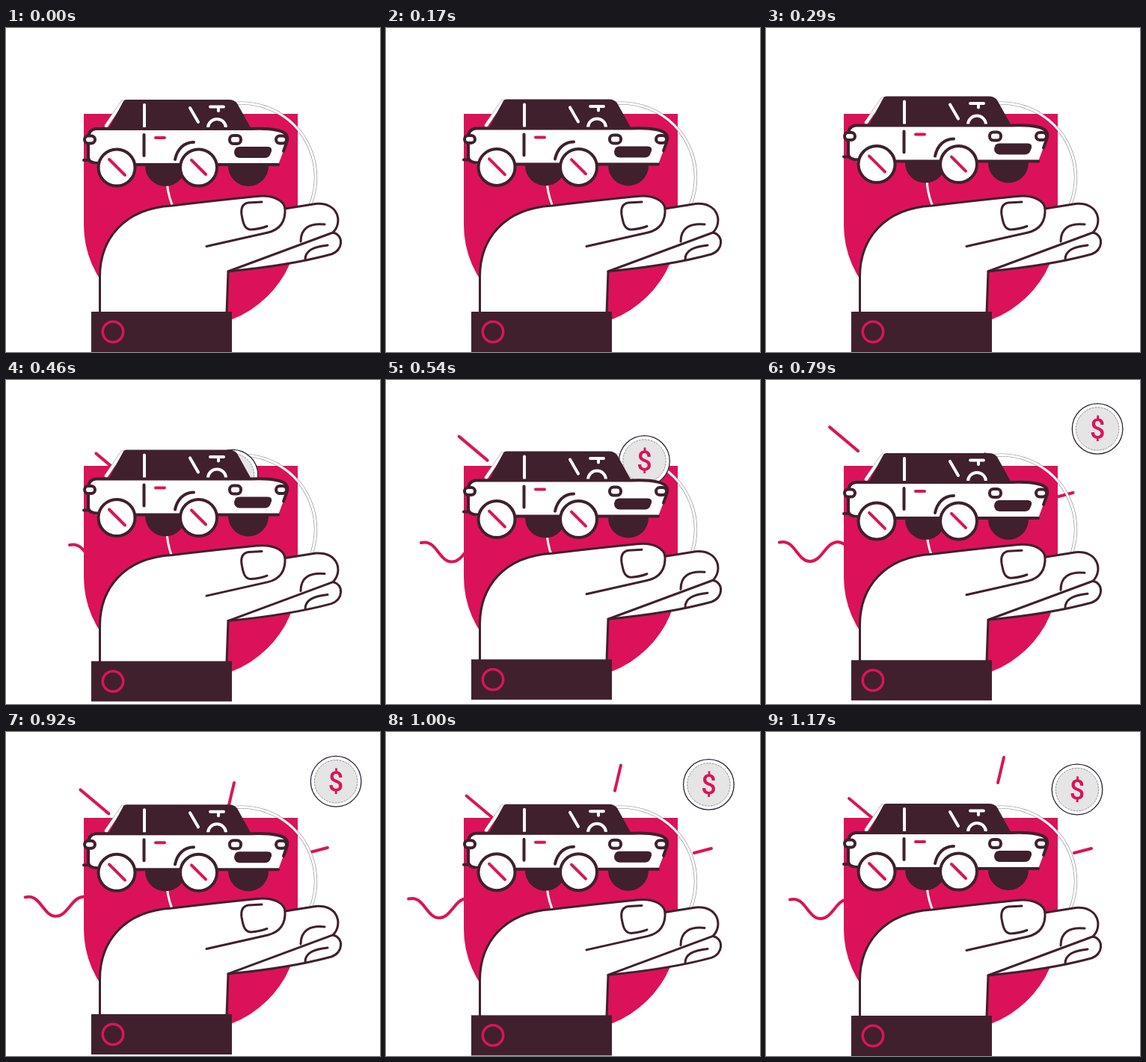
Write an HTML page that moves like this. It is 500x434 px and loops after 1.29 s.

```html
<!DOCTYPE html>
<html lang="en">
<head>
<meta charset="utf-8">
<title>Car and hand</title>
<style>
  html, body { margin: 0; width: 100%; height: 100%; overflow: hidden; background: #fff; }
  svg { display: block; width: 100vw; height: 100vh; stroke-linecap: round; stroke-linejoin: round; }
  .ink { fill: none; stroke: #40202d; stroke-width: 4; }
  .hand .ink { stroke-width: 3; }
  .pink { fill: none; stroke: #d91558; stroke-width: 4; }
  .white { fill: none; stroke: #fff; stroke-width: 4; }
  .paper { fill: #fff; }
  .dark { fill: #40202d; }
  text { font: 500 36px Roboto, "Open Sans", sans-serif; fill: #db1259; text-anchor: middle; }
</style>
</head>
<body>
<svg viewBox="0 0 500 434">
  <circle cx="314.5" cy="200" r="99.5" fill="none" stroke="#888" stroke-width="4.2"/>
  <path id="wave" class="pink" d="M18 215.5Q20 215 23 215C39 215 43 241 59 241S80 215 96 215S117 241 133 241"/>
  <path id="rayLeft" class="pink" d="M0 0L38 32"/>
  <path id="rayTop" class="pink" d="M0 0L-8 34"/>
  <path id="rayRight" class="pink" d="M0 0L-23 6"/>
  <path fill="#db1259" d="M104 115H390V264A143 137 0 0 1 104 264Z"/>
  <circle class="white" cx="314.5" cy="200" r="99.5" style="stroke-width:3"/>

  <g id="coin">
    <circle class="paper" r="33.8" stroke="#2b2030" stroke-width="1.3"/>
    <circle r="28.7" fill="#e5e5e5" stroke="#777" stroke-width=".8" stroke-dasharray="2 2"/>
    <text y="13">$</text>
  </g>

  <g id="car">
    <circle class="dark" cx="213" cy="185" r="27"/>
    <circle class="dark" cx="324" cy="185" r="27"/>
    <path d="M134 131L156 99" fill="none" stroke="#999" stroke-width="5"/>
    <path class="white" d="M134 131L156 99"/>
    <path class="dark" d="M136 137L157 98Q158 96 161 96H298Q305 96 309 101L329 137Z"/>
    <path class="white" d="M185 103V135M246 107L257 126M273 105.5H291M284 105.5V111"/>
    <circle class="white" cx="282" cy="134" r="12"/>
    <path class="paper" d="M120 135H328L362 136Q378 139 376 151L364 183H122Q110 182 110 174V150Q109 136 120 135Z"/>
    <path class="ink" d="M124 181Q110 181 110 173V148Q110 136 120 135H328Q350 134 363 137Q378 140 376 151L371 165
      M104 177H111M172 183H364M184.5 143V171M226 176C229 162 238 153 251 153"/>
    <g class="ink" style="fill:#fff">
      <rect x="105" y="144.5" width="14" height="10" rx="5"/>
      <rect x="299" y="144" width="15" height="11" rx="5"/>
      <rect x="361" y="144.5" width="14" height="10" rx="5"/>
    </g>
    <path class="dark" d="M312 159H350Q356 159 355 165L353 170Q351 174 346 174H312Q305 173 305 166Q306 159 312 159Z"/>
    <path class="pink" d="M200 147H212"/>
    <g class="ink" style="fill:#fff">
      <circle cx="148" cy="187" r="24.5"/>
      <circle cx="257.5" cy="187" r="24.5"/>
    </g>
    <path class="pink" d="M138 176L159 197M248 177L267 196"/>
  </g>

  <g id="hand" class="hand">
    <path class="ink" style="fill:#fff" d="M125.5 382V332C126 284 156 242 222 238Q280 231 335 225.5C359 223 372 232 373 242L414 235.5
      C444 233 451 260 437 274C452 277 451 298 435 303Q380 318 297 326L295 382"/>
    <path class="ink" d="M373 241C374 258 367 270 350 274L268 292.5M297 326L437 274
      M342 233L324 234Q313 236 315 250C317 262 319 270 328 270Q340 269 349 265.5
      M426 263C406 261 394 268 394 286M430 291C411 293 400 298 400 310"/>
    <rect class="dark" x="114" y="380" width="188" height="54"/>
    <circle class="pink" cx="143" cy="407" r="13.7" style="stroke-width:3.5"/>
  </g>
</svg>
<script>
const LOOP = 1290, STEPS = 31;

function place(id, x, y) {
  document.getElementById(id).setAttribute("transform", `translate(${x} ${y})`);
}

function draw() {
  const step = Math.floor(performance.now() % LOOP * STEPS / LOOP + .11);

  // Eased progress between two steps, and a rise followed by a fall
  const ease = (from, to) => {
    const u = Math.min(1, Math.max(0, (step - from) / (to - from)));
    return u * u * (3 - 2 * u);
  };
  const bump = (from, peak, to) => ease(from, peak) - ease(peak, to);

  place("car", 0, 2 * bump(11, 18, 28) - 4.6 * bump(3, 7.5, 15));
  place("hand", 0, -6.8 * bump(7, 15, 26));

  // Parts shoot out from behind the car, then settle back
  const out = ease(8, 16), back = ease(16, 26);
  place("wave", 100 - 104 * out + 18 * back, 8 - 8 * out + 9 * back);
  place("rayLeft", 140 - 62 * out + 33 * back, 118 - 62 * out + 33 * back);

  const toss = ease(7, 19.5), settle = ease(20.5, 28);
  place("coin", 258 + 186 * toss - 28 * settle, 147 - 82 * toss + 12 * settle);

  const up = ease(18, 26), aside = ease(14, 24);
  place("rayTop", 292 + 26 * up, 102 - 68 * up);
  place("rayRight", 386 + 49 * aside, 146 + 10 * aside);

  requestAnimationFrame(draw);
}
draw();
</script>
</body>
</html>
```
